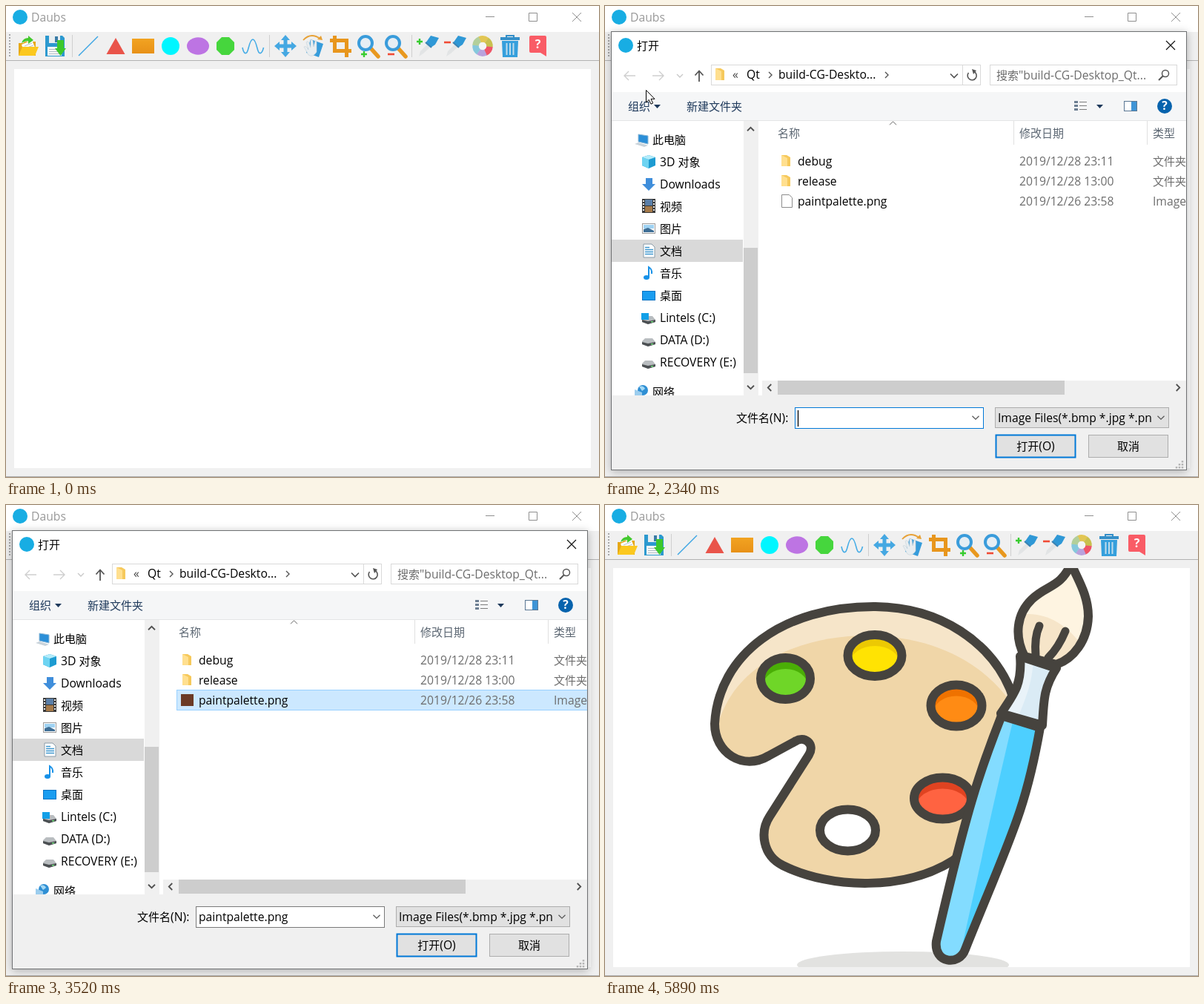
Write an HTML page that moves like this. It is 800 px wide and 635 px high and loops after 5970 ms.

```html
<!DOCTYPE html>
<html lang="zh-CN">
<head>
<meta charset="utf-8">
<title>Image editor demo</title>
<style>
html, body { margin: 0; width: 100%; height: 100%; overflow: hidden; background: #f0f0f0; }
svg { display: block; width: 800px; height: 635px; font-family: "Open Sans", "Noto Sans CJK SC", "Noto Sans CJK", "Noto Sans", sans-serif; font-size: 15.7px; }
text { white-space: pre; }
#dialog { transform-origin: 396px 325px; filter: drop-shadow(0 2px 6px rgba(0,0,0,.28)); }
</style>
</head>
<body>
<svg id="stage" viewBox="0 0 800 635" fill="none"></svg>
<script>
const LOOP = 5970;
const INK = '#46433e';

const rect = (x, y, w, h, fill, more = '') => `<rect x="${x}" y="${y}" width="${w}" height="${h}" fill="${fill}" ${more}/>`;
const box = (x, y, w, h, fill, line, lw = 1, more = '') =>
  rect(x + lw / 2, y + lw / 2, w - lw, h - lw, fill, `stroke="${line}" stroke-width="${lw}" ${more}`);
const path = (d, fill = 'none', more = '') => `<path d="${d}" fill="${fill}" ${more}/>`;
const line = (d, color, w = 1, more = '') => path(d, 'none', `stroke="${color}" stroke-width="${w}" ${more}`);
const disc = (x, y, r, fill, more = '') => `<circle cx="${x}" cy="${y}" r="${r}" fill="${fill}" ${more}/>`;
const oval = (x, y, rx, ry, fill, more = '') => `<ellipse cx="${x}" cy="${y}" rx="${rx}" ry="${ry}" fill="${fill}" ${more}/>`;
const group = (id, body, more = '') => `<g id="${id}" ${more}>${body}</g>`;
const at = (x, y, body) => `<g transform="translate(${x} ${y})">${body}</g>`;
const clip = (id, body) => `<clipPath id="${id}">${body}</clipPath>`;
// y is the vertical middle of the text; Chinese runs are a little smaller
const text = (x, y, s, fill = '#000', more = '') =>
  `<text x="${x}" y="${y + 5.5}" fill="${fill}" ${more}>${s.replace(/[\u3000-\u9fff]+/g, m => `<tspan font-size="15">${m}</tspan>`)}</text>`;
// open chevron pointing right, turned by deg
const chevron = (x, y, deg, color, size = 4, w = 1.4) =>
  line(`M${-size / 2} ${-size}L${size / 2} 0L${-size / 2} ${size}`, color, w, `transform="translate(${x} ${y}) rotate(${deg})"`);

function toolbar() {
  const lens = x => at(x, 0,
    line('M5 58L14 68', '#e8981f', 5.5, 'stroke-linecap="round"') +
    disc(-3, 50, 9, '#e6eef4', 'stroke="#3a9cdb" stroke-width="4"'));
  const plus = (x, y) => line(`M${x - 4} ${y}h8M${x} ${y - 4}v8`, '#38cc2f', 2.4);
  const minus = (x, y) => line(`M${x - 4} ${y}h9`, '#f04a35', 2.6);
  const dropper = x => at(x, 0,
    path('M-12 68L-10 61 0 51 4 55-6 64Z', '#e2e4e5') +
    path('M-3 50L4 40 15 43 10 52 4 56Z', '#2f98d6') + line('M-3 49L5 56', '#3b83b3', 2));
  const wheel = ['#e2c653', '#c9c04f', '#ef5568', '#b9a2dc', '#86c8dc', '#b3cf9a'].map((c, i) => {
    const p = a => `${(643 + 9.5 * Math.cos(a)).toFixed(1)} ${(54 + 9.5 * Math.sin(a)).toFixed(1)}`;
    const a = -2 + i * Math.PI / 3;
    return line(`M${p(a)}A9.5 9.5 0 0 1 ${p(a + Math.PI / 3 + .03)}`, c, 8.5);
  }).join('');
  const octagon = [...Array(8)].map((_, i) => {
    const a = (i + .5) * Math.PI / 4;
    return `${296 + 13 * Math.cos(a)},${54 + 13 * Math.sin(a)}`;
  }).join(' ');
  return line('M5 38V70', '#a8a8a8', 2, 'stroke-dasharray="2 2"') +
    line('M89.5 39V69M355.5 39V69M547.5 39V69', '#cfcfcf') +
    // open, save
    path('M17 50H23L25 48H40V67H17Z', '#e6a817') + path('M21 52L35 46 40 58 24 62Z', '#fbfbfb') +
    line('M25 54L35 50M26 57L37 53', '#b9c2c8') + path('M22 55H44L39 67H17Z', '#fbc81f') +
    path('M21 50Q23 43 30 43V40L37 46 30 51V47Q25 47 21 50Z', '#43c92e') +
    path('M53 40H76L79 43V68H53Z', '#2c99cf') + rect(58, 40, 15, 10, '#e9eef1') + rect(66, 41, 4, 8, '#397ba5') +
    rect(56, 55, 19, 12, '#f7f7f7') + line('M58 58.5H72M58 61.5H72M58 64.5H72', '#aebbc4') +
    path('M69 46H78V57H81L73.500 67 66 57H69Z', '#3cc82b') +
    // shapes
    line('M98 67L124 41', '#3da5e3', 1.5) + path('M148 43L160.500 65H135.500Z', '#e9544a') +
    rect(170, 44, 30, 20, 'url(#amber)') + disc(222, 54, 12, '#00f6ff') + oval(259, 54, 15, 11.7, '#bd74e3') +
    `<polygon points="${octagon}" fill="#46d63d"/>` +
    line('M319 56C321 66 325 66 327 57C331 41 335 41 339 57C341 66 345 66 347.500 56', '#45ace6', 1.6) +
    // move, rotate, crop, zoom
    path('M377 39L383 46H379.500V51.500H385V48L392 54 385 60V56.500H379.500V62H383L377 69 371 62H374.500V56.500H369V60L362 54 369 48V51.500H374.500V46H371Z', '#45a8e2') +
    path('M411 45L428 51 422 69 405 63Z', '#369cdb') +
    path('M402 55Q405 53 408 59L405 49Q407 46 409 50L411 56 411 46Q413 44 414 47L415 55 417 47Q419 46 419 49L419 62Q414 70 408 66Z', '#e8edf0', 'stroke="#c6d2d9" stroke-width=".6"') +
    line('M401 46Q411 35 424 44', '#e7a136', 1.8) + path('M427 46L420 45 425 40Z', '#e7a136') +
    line('M443.500 40V60.500H466M437 46.500H459.500V69', '#e8961d', 5) +
    lens(488) + plus(483, 65) + lens(525) + minus(519, 65) +
    // pickers, wheel, bin, help
    plus(558, 48) + dropper(569) + minus(595, 49) + dropper(606) + wheel + disc(643, 54, 5, '#f4f4f4') +
    rect(667, 42, 26, 4, '#348fc8') + line('M675 42V40H685V42', '#348fc8', 2) +
    path('M669 47H691L690 69H670Z', '#359fdc') + line('M675.500 50V66M680 50V66M684.500 50V66', '#bfdcec', 2) +
    path('M708 40H727Q729 40 729 42V68L721 63H708Q706 63 706 61V42Q706 40 708 40Z', '#f95c66') +
    text(717.5, 51, '?', '#fff', 'text-anchor="middle" font-weight="700" font-size="16"');
}

function picture() {
  const body = 'M365 137C455 138 520 187 546 247C568 300 540 430 470 479C405 520 305 518 240 486C212 472 209 440 222 420L275 337C284 322 269 310 256 319L221 338C186 359 148 334 148 295C153 202 240 136 365 137Z';
  const leaf = 'M629 79C636 98 652 120 652 150C651 183 632 207 609 215L566 204C552 177 555 147 576 127C597 107 614 112 629 79Z';
  const handle = 'M535 284C505 360 488 410 447 588C443 618 478 622 486 599C545 452 567 415 587 300Z';
  const ferrule = 'M560 204L609 220C592 246 592 262 590 297L534 281C551 256 563 242 560 204Z';
  const stroke = `stroke="${INK}" stroke-width="12" stroke-linejoin="round" stroke-linecap="round"`;
  let holes = '';
  const defs = clip('bodyClip', path(body, '#000')) + clip('leafClip', path(leaf, '#000')) +
    clip('handleClip', path(handle, '#000')) + clip('ferruleClip', path(ferrule, '#000'));
  [[243.5, 234, 33.5, '#4aae06', '#6fd628'], [364, 203, 36.5, '#ecc903', '#ffe303'],
   [474, 270.5, 34.5, '#ef7200', '#ff8b14'], [455.5, 395.5, 38.5, '#e04321', '#ff6341'],
   [327.5, 438.5, 37.5, '#fff', '#fff']].forEach(([x, y, r, dark, light], i) => {
    holes += clip('hole' + i, oval(x, y, r, 28, '#000')) + oval(x, y, r, 28, dark) +
      oval(x, y + 11, r - 3, 24, light, `clip-path="url(#hole${i})"`) + oval(x, y, r, 28, 'none', stroke);
  });
  return `<defs>${defs}</defs>` + oval(402, 620, 143, 18, '#e2e2e0') +
    path(body, '#f6e5c9') +
    path('M148 320C158 225 250 176 355 176C440 177 510 210 550 270V520H148Z', '#f0d6a8', 'clip-path="url(#bodyClip)"') +
    path(body, 'none', stroke) + holes +
    path(leaf, '#fef4e1') + path('M550 150C585 140 620 155 645 192L620 225H550Z', '#f6e5c9', 'clip-path="url(#leafClip)"') +
    path(leaf, 'none', stroke) + line('M586 163Q579 178 581 203M621 170Q612 192 598 206', INK, 11, 'stroke-linecap="round"') +
    path(handle, '#4dcfff') + path('M553 280C535 355 525 400 478 612H430L530 280Z', '#83dcff', 'clip-path="url(#handleClip)"') +
    path(handle, 'none', stroke) +
    path(ferrule, '#daebf5') + path('M555 200L578 208C576 245 566 262 556 290H525Z', '#e9f3f9', 'clip-path="url(#ferruleClip)"') +
    path(ferrule, 'none', stroke);
}

const folder = (x, y, h) => path(`M${x} ${y}h7l5 3v${h - 3}h-12Z`, '#f6c95c') + path(`M${x} ${y}l8 4v${h - 4}h-8Z`, '#ffdf8f');
const drive = y => path(`M50 ${y}L54 ${y - 4}H64L68 ${y + 1}V${y + 4}L58 ${y + 7} 50 ${y + 4}Z`, '#b9bdc0') +
  path(`M50 ${y + 1}L58 ${y + 3}V${y + 7}L50 ${y + 4}ZM58 ${y + 3}L68 ${y + 1}V${y + 4}L58 ${y + 7}Z`, '#4c5053') + rect(62, y + 3, 3, 1.5, '#6fe07a');

function navIcons() {
  return path('M45 173L58 175V186L45 183Z', '#2b8fd8', 'stroke="#8eb9d6"') + path('M40 186L45 184 58 188 53 190Z', '#c9d3da') +
    path('M50 204L59 201 68 204V215L59 219 50 215Z', '#1d9bd1') + path('M50 204L59 207V219L50 215Z', '#6ed4f2') + path('M50 204L59 201 68 204 59 207Z', '#b4ecfa') +
    path('M55 232H64V240H68L59 249 50 240H55Z', '#3f8edb') +
    rect(50, 260, 18, 19, '#3b3b3b') + rect(54, 261, 10, 8, '#5a7fa8') + rect(54, 270, 10, 8, '#a57a4a') +
    line('M52 262V278M66 262V278', '#e8e8e8', 2, 'stroke-dasharray="2 2"') +
    box(50, 293, 18, 14, '#fff', '#9a9a9a') + rect(52, 295, 14, 5, '#9fd2f2') + path('M52 305V301L58 299 66 303V305Z', '#3d6d94') +
    path('M52 321H63L67 325V339H52Z', '#fff', 'stroke="#8a9ba8"') + line('M54 325.500H60M54 328.500H65M54 331.500H65M54 334.500H65', '#3f97cf', 1.4) +
    oval(56, 366, 4, 3, '#1791e8') + line('M59 366V352Q64 355 63 361', '#1791e8', 2) +
    box(50, 384, 18, 13, '#1a9df0', '#0c74c4') +
    drive(422) + rect(49, 414, 10, 9, '#12a0e8') + drive(452) + drive(482) +
    disc(51, 518, 7, '#2f8fd4') + path('M40 517L50 521V529H40Z', '#9ccdee') + path('M46 513Q52 511 54 516L50 519Z', '#a4d9f4');
}

function dialog() {
  const names = ['3D 对象', 'Downloads', '视频', '图片', '文档', '音乐', '桌面', 'Lintels (C:)', 'DATA (D:)', 'RECOVERY (E:)'];
  const nav = group('navHover', rect(9, 165, 177, 30, '#e5f3ff')) + rect(9, 315, 177, 30, '#d9d9d9') +
    group('arrows', chevron(23, 180, 90, '#c4c4c4', 5, 1.1) + names.map((_, i) => chevron(33, 211 + 30 * i, 0, '#d0d0d0', 5, 1.1)).join('') + chevron(23, 521, 0, '#d0d0d0', 5, 1.1)) +
    navIcons() + text(64, 180, '此电脑') + names.map((s, i) => text(74, 210 + 30 * i, s)).join('') + text(64, 520, '网络');
  const files = [['debug', '28 23:11', '文件夹'], ['release', '28 13:00', '文件夹'], ['paintpalette.png', '26 23:58', 'Image']]
    .map(([name, day, kind], i) => {
      const y = 209.5 + 27 * i;
      return text(260, y, name) + text(559, y, '2019/12/' + day, '#6d6d6d') + text(739, y, kind, '#6d6d6d');
    }).join('');
  const list = `<rect id="row" x="230.500" y="249.500" width="560" height="27"/>` + files + folder(238, 201, 15) + folder(238, 228, 15) +
    group('page', path('M238.500 254.500H248.500L252.500 258.500V271.500H238.500Z', '#fff', 'stroke="#8c8c8c"')) +
    group('thumb', rect(236, 255, 17, 16, '#6b3a25'));
  return `<defs>${clip('navClip', rect(9, 155, 178, 370, '#000'))}${clip('listClip', rect(208, 155, 576, 350, '#000'))}${clip('typeClip', rect(527, 541, 210, 28, '#000'))}</defs>` +
    box(8, 34, 777, 592, '#fff', '#6f7173') + rect(9, 116, 775, 38, '#f5f6f7') + line('M9 154.500H784', '#e4e5e6') + rect(9, 525, 775, 100, '#f0f0f0') +
    disc(28, 53, 10, '#18ade3', 'id="dlgLogo"') + text(43, 53, '打开', '#000', 'id="dlgTitle"') +
    line('M757 47L769 59M769 47L757 59', '#111', 1.2) +
    // address and search
    line('M41 94H26M32 88L26 94 32 100M64 94H79M73 88L79 94 73 100', '#cfcfcf', 1.4) + chevron(101, 94, 90, '#c9c9c9', 4) +
    line('M127 102V88M121.500 93.500L127 87.500 132.500 93.500', '#555', 1.8) +
    box(143, 79, 364, 28, '#fff', '#d9d9d9') + line('M482.500 80V106', '#d9d9d9') + folder(149, 84, 16) +
    text(172, 92, '«', '#444') + text(191, 92, 'Qt') + chevron(223, 93, 0, '#555') + text(234, 92, 'build-CG-Deskto...') + chevron(380, 93, 0, '#555') +
    chevron(471, 94, 90, '#555', 5, 1.7) + line('M498 88.500A6 6 0 1 1 490.500 90', '#555', 1.6) + path('M495 85L501 87 497 92Z', '#555') +
    box(519, 79, 253, 28, '#fff', '#d9d9d9') + text(528, 93, '搜索"build-CG-Desktop_Qt...', '#6d6d6d') +
    disc(756, 91, 4.5, 'none', 'stroke="#555" stroke-width="1.500"') + line('M753 94L747 100', '#555', 2) +
    // command row
    text(31, 135, '组织', '#1e395b') + path('M66 133H75L70.500 138Z', '#1e395b') + text(110, 135, '新建文件夹', '#1e395b') +
    line('M633 129.500H638M633 134.500H638M633 139.500H638', '#6d7f93', 3) + line('M640 129.500H650M640 134.500H650M640 139.500H650', '#7d7d7d', 1.2) +
    path('M663 133H672L667.500 138Z', '#1e395b') + box(700, 128, 18, 14, '#fff', '#5b7894') + rect(710, 129, 7, 12, '#3f95d6') +
    disc(755, 135, 10, '#0763ad') + text(755, 134.5, '?', '#fff', 'text-anchor="middle" font-weight="700"') +
    // panes
    `<g clip-path="url(#navClip)">${nav}</g>` +
    rect(187, 155, 20, 370, '#f0f0f0') + rect(187, 326, 19, 169, '#cdcdcd') + chevron(196.5, 166, -90, '#505050', 4.5, 1.8) + chevron(196.5, 514, 90, '#505050', 4.5, 1.8) +
    text(233, 171, '名称', '#5b6672') + chevron(388.5, 158, -90, '#666', 4.5, 1) + text(559, 171, '修改日期', '#5b6672') + text(739, 171, '类型', '#5b6672') +
    line('M551.500 155V187M731.500 155V187', '#e0e0e0') + `<g clip-path="url(#listClip)">${list}</g>` +
    rect(212, 505, 572, 20, '#f0f0f0') + rect(233, 505, 387, 19, '#cdcdcd') + chevron(222, 514.5, 180, '#505050', 4.5, 1.8) + chevron(773, 514.5, 0, '#505050', 4.5, 1.8) +
    // bottom form
    text(177, 555, '文件名(N):') + box(256, 541, 255, 29, '#fff', '#7a7a7a', 1, 'id="field"') +
    line('M260.500 545V567', '#000', 1.3, 'id="caret"') + group('mark', rect(260, 545, 123, 22, '#0078d7')) +
    text(260, 555, 'paintpalette.png', '#000', 'id="fileName"') + chevron(500, 555, 90, '#555', 4.5, 1.2) +
    box(526, 541, 235, 28, '#e1e1e1', '#adadad') + `<g clip-path="url(#typeClip)">${text(530, 555, 'Image Files(*.bmp *.jpg *.png *.jpeg)')}</g>` + chevron(750, 555, 90, '#555', 4.5, 1.2) +
    `<rect id="ok" x="527.500" y="578.500" width="107" height="30" stroke="#0078d7"/>` + text(581, 593, '打开(O)', '#000', 'text-anchor="middle"') +
    box(652, 578, 108, 31, '#e1e1e1', '#adadad') + text(706, 593, '取消', '#000', 'text-anchor="middle"') +
    line('M779 613V624M775 617V624M771 621V624', '#b5b5b5', 2.5, 'stroke-dasharray="2.500 1.500"');
}

document.getElementById('stage').innerHTML =
  `<defs><linearGradient id="amber" x2="0" y2="1"><stop stop-color="#f2a321"/><stop offset="1" stop-color="#e89118"/></linearGradient>${clip('canvasClip', rect(11, 85, 778, 538, '#000'))}</defs>` +
  rect(0, 0, 800, 635, '#f0f0f0') + rect(0, 0, 800, 35, '#fff') + line('M0 73.500H800', '#b2b2b2') +
  disc(19, 15, 10, '#18ade3') + text(34, 15, 'Daubs', '#000', 'id="winTitle"') +
  line('M647 14.500H659M705.500 9.500H716.500V20.500H705.500ZM764 9L776 21M776 9L764 21', '#000', 1, 'id="winKeys"') +
  group('openHover', box(12, 36, 37, 36, '#d3e9f9', '#90c8f6')) + toolbar() +
  rect(11, 85, 778, 538, '#fff') + group('picture', picture(), 'clip-path="url(#canvasClip)"') +
  line('M0 634.500H800', '#aaa', 1, 'id="edge"') + group('dialog', dialog()) +
  group('cursor', path('M.500 .500V17L4.300 13.400 7 19.200 9.600 18 7 12.300H12Z', '#fff', 'stroke="#000"'));

// pointer tip: time, x, y
const TIPS = [
  [0, -99, -99], [220, 659, 618], [300, 548, 510], [380, 425, 400], [460, 300, 292], [540, 190, 200], [620, 105, 130], [700, 52, 92], [780, 28, 76],
  [940, 27, 69], [1020, 25, 64], [1170, 25, 62], [2100, 27, 70], [2180, 29, 77], [2260, 38, 90], [2340, 55, 113], [2410, 76, 136], [2490, 103, 157],
  [2570, 127, 174], [2650, 168, 204], [2720, 215, 228], [2800, 262, 248], [2880, 298, 259], [2960, 316, 264], [3040, 320, 266], [3200, 368, 335],
  [3280, 442, 436], [3360, 570, 525], [3440, 722, 612], [3520, -99, -99], [3680, 702, 614], [3760, 675, 606], [3840, 648, 602], [3920, 625, 601],
  [4000, 610, 602], [4080, 604, 604], [4160, 602, 604], [4320, 598, 599], [4400, 591, 591], [4870, 596, 594], [4950, 618, 601], [5030, 646, 612], [5110, 674, 626], [5190, -99, -99]
];
// dialog: time, opacity, scale
const FADES = [[0, 0, 1], [2260, .5, .97], [2340, 1, 1], [4320, .5, .98], [4400, .06, .957], [4480, 0, 1]];

const $ = id => document.getElementById(id);
const show = (id, on) => $(id).setAttribute('visibility', on ? 'visible' : 'hidden');
const set = (id, attrs) => { for (const k in attrs) $(id).setAttribute(k, attrs[k]); };
const current = (table, t) => table.findLast(row => row[0] <= t);

function draw(t) {
  const within = (a, b) => t >= a && t < b;
  const active = within(1640, 1790) || within(4320, 5890);
  const picked = t >= 3040, leaving = t >= 4240;

  set('winTitle', { fill: active ? '#000' : '#999' });
  set('winKeys', { stroke: active ? '#000' : '#8f8f8f' });
  set('edge', { stroke: active ? '#666' : '#aaa' });
  show('openHover', within(1020, 2100));
  show('picture', t >= 4320);

  const [, alpha, scale] = current(FADES, t);
  $('dialog').style.display = alpha ? '' : 'none';
  $('dialog').style.opacity = alpha;
  $('dialog').style.transform = scale === 1 ? 'none' : `scale(${scale})`;
  if (alpha) {
    show('dlgLogo', !leaving);
    set('dlgTitle', { x: leaving ? 18 : 43 });
    show('arrows', within(2490, 2720));
    show('navHover', within(2570, 2720));
    set('navHover', { transform: `translate(0 ${t >= 2650 ? 30 : 0})` });
    const hover = within(2880, 3040);
    show('row', hover || picked);
    set('row', { fill: leaving ? '#d9d9d9' : hover ? '#e5f3ff' : '#cce8ff', stroke: leaving ? '#d9d9d9' : hover ? '#e5f3ff' : '#99d1ff' });
    show('page', !picked);
    show('thumb', picked);
    set('field', { stroke: t < 3360 ? '#0078d7' : '#7a7a7a' });
    show('caret', within(2340, 3040));
    show('mark', leaving);
    show('fileName', picked);
    set('fileName', { fill: leaving ? '#fff' : '#000' });
    const over = t >= 3920;
    set('ok', { fill: within(4160, 4240) ? '#cce4f7' : over ? '#e5f1fb' : '#e1e1e1', 'stroke-width': over ? 1 : 2 });
  }
  const [, x, y] = current(TIPS, t);
  set('cursor', { transform: `translate(${x} ${y})` });
}

const start = performance.now();
function tick() {
  draw((performance.now() - start) % LOOP);
  requestAnimationFrame(tick);
}
tick();
</script>
</body>
</html>
```
